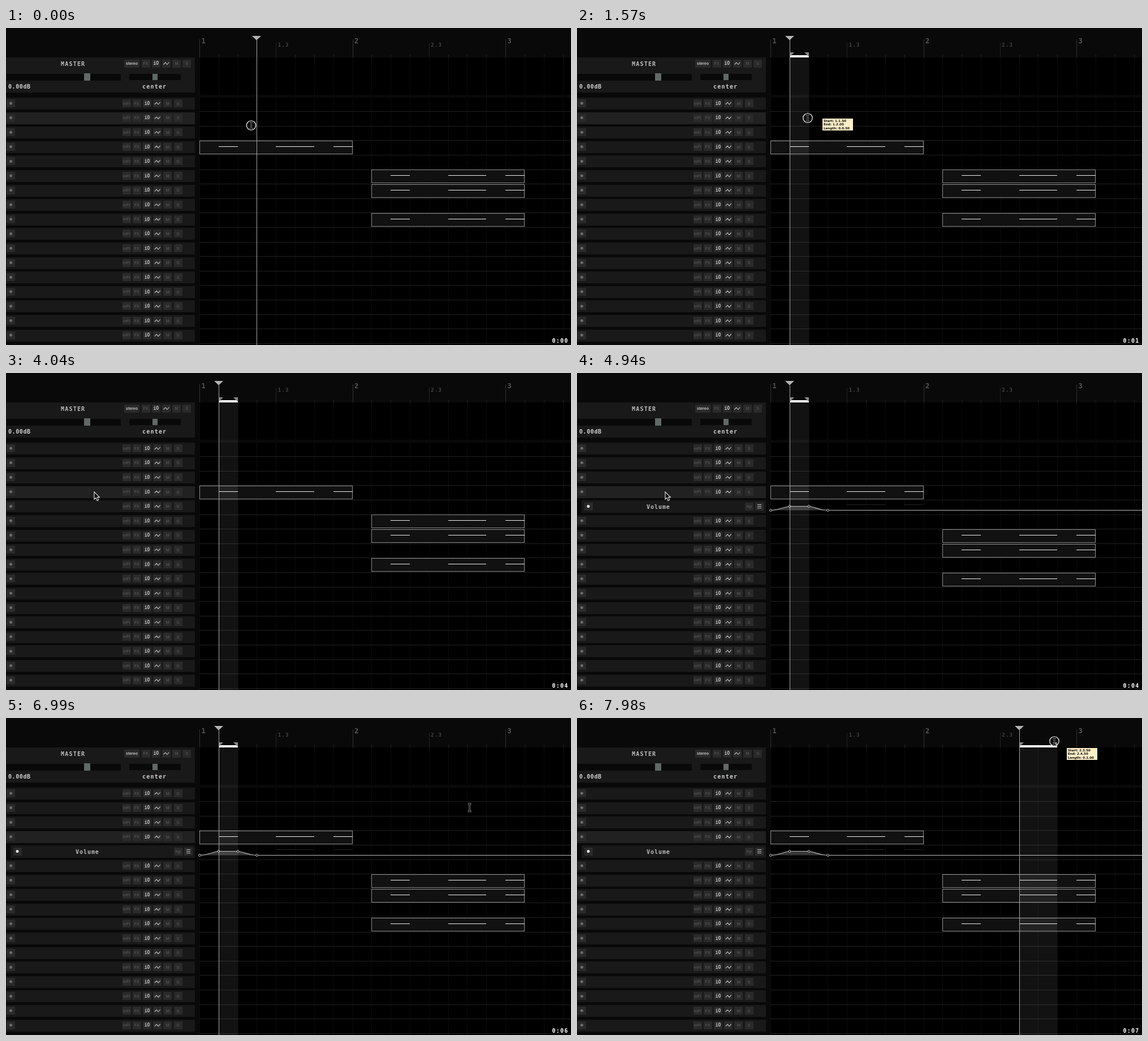
Animation, 999 px wide and 560 px high, one loop 8000 ms. Source, as an HTML page:

```html
<!DOCTYPE html>
<html lang="en">
<head>
<meta charset="utf-8">
<title>Track automation</title>
<style>
html, body { margin: 0; width: 100%; height: 100%; overflow: hidden; background: #000; }
svg { display: block; width: 999px; height: 560px; }
text { font-family: "DejaVu Sans Mono", monospace; font-weight: bold; white-space: pre; }
.small { font-family: "Liberation Sans", sans-serif; }
.tip { font-family: "DejaVu Sans", sans-serif; }
rect { shape-rendering: crispEdges; }
</style>
</head>
<body>
<svg id="stage" viewBox="0 0 999 560"></svg>
<script>
const LOOP = 8000;
const LEFT = 342, BEAT = 33.82, TOP = 122, ROW = 25.6, ROWS = 17;
const beatX = n => LEFT + n * BEAT;
const rowY = i => TOP + i * ROW;

// Markup helpers
const rect = (x, y, w, h, fill, more = '') =>
  `<rect x="${x}" y="${y}" width="${w}" height="${h}" fill="${fill}" ${more}/>`;
const hline = (x1, x2, y, color) => rect(x1, Math.round(y), x2 - x1, 1, color);
const vline = (x, y1, y2, color) => rect(Math.round(x), y1, 1, y2 - y1, color);
const text = (x, y, str, size, fill, more = '') =>
  `<text x="${x}" y="${y}" font-size="${size}" fill="${fill}" ${more}>${str}</text>`;
const group = (id, body, more = '') => `<g id="${id}" ${more}>${body}</g>`;
const path = (d, more) => `<path d="${d}" ${more}/>`;
const mid = 'text-anchor="middle"';
const wide = 'letter-spacing="1.2"';

const DIM = '#4e4e4e', LIT = '#c4c4c4';

function button(cx, cy, body, w = 15) {
  return rect(Math.round(cx - w / 2), Math.round(cy - 7), w, 14, '#2a2a2a') + body;
}

function label(cx, cy, str, size, fill, cls = 'small') {
  return text(cx, cy + size * 0.36, str, size, fill, `${mid} class="${cls}"`);
}

function toolButtons(x, cy) {
  const at = i => x + i * 18.2;
  const zig = `M${at(2) - 5} ${cy + 2}l3.5 -3.5l3 3.5l3.5 -4`;
  return button(at(0), cy, label(at(0), cy, 'FX', 7, DIM)) +
    button(at(1), cy, label(at(1), cy, 'iO', 8, LIT, '')) +
    button(at(2), cy, path(zig, `fill="none" stroke="${LIT}" stroke-width="1.1"`)) +
    button(at(3), cy, label(at(3), cy, 'M', 7.5, DIM)) +
    button(at(4), cy, label(at(4), cy, 'S', 7.5, DIM));
}

function master() {
  return rect(0, 52, 334, 62, '#191919') +
    text(97, 67, 'MASTER', 10, '#bcbcbc', wide) +
    button(222.5, 62.5, label(222.5, 62, 'stereo', 7, LIT), 27) +
    toolButtons(247, 62.5) +
    rect(1, 81, 202, 12, '#090909') + rect(138, 80, 11, 13, '#616966') +
    rect(218, 81, 91, 11, '#090909') + rect(259, 81, 9, 11, '#616966') +
    text(4, 107, '0.00dB', 10, '#d0d0d0', 'letter-spacing="0.6"') +
    text(241, 107, 'center', 10, '#d0d0d0', wide);
}

function track(i) {
  const y = rowY(i), cy = y + 11;
  return group('track' + i,
    rect(0, Math.round(y + 1), 334, 21, '#191919', `id="back${i}"`) +
    button(8, cy, `<circle cx="8.5" cy="${cy}" r="2.5" fill="#6c6c6c"/>`) +
    button(213, cy, label(213, cy, 'inFI', 7, DIM)) +
    toolButtons(231.3, cy));
}

function ruler() {
  let out = rect(0, 0, 999, 52, '#090909');
  for (let n = 0; n < 20; n++) {
    const x = beatX(n), bar = n % 8 === 0, half = n % 8 === 4;
    out += vline(x, bar ? 20 : half ? 26 : 47, 52, bar ? '#333' : '#222');
    out += vline(x, 52, 560, '#0c0c0c');
    const num = 1 + Math.floor(n / 8);
    if (bar) out += text(x + 3.5, 27, num, 12, '#555');
    if (half) out += text(x + 3.5, 33, num + '.3', 9, '#444', wide);
  }
  return out;
}

function clip(beat, row) {
  const x = Math.round(beatX(beat)), y = Math.round(rowY(row)) + 0.5;
  const note = (a, b) => hline(Math.round(beatX(beat + a)), Math.round(beatX(beat + b)), y + 9.5, '#eee');
  return rect(x + 0.5, y, 270, 23, '#111', 'stroke="#8c8c8c"') +
    note(1, 2) + note(4, 6) + note(7, 8);
}

function lane() {
  const curve = 'C360 242.5 362 237 376 235.5H410C424 237 426 242.5 443.5 242.5';
  const node = (x, y) => `<circle cx="${x}" cy="${y}" r="1.9" fill="#000" stroke="#ccc"/>`;
  return rect(0, 224, 335, 24, '#090909') + rect(8, 225, 326, 22, '#191919') +
    button(20, 235.5, '<circle cx="20" cy="235.5" r="2.5" fill="#e6e6e6"/>') +
    text(123, 240, 'Volume', 10, '#bcbcbc', 'letter-spacing="0.95"') +
    button(304.5, 235.5, label(304.5, 235, 'bp', 8, DIM)) +
    button(322.5, 235.5, [232, 235, 238].map(y => hline(319, 326, y, LIT)).join('')) +
    hline(477, 545, 232, '#242424') + hline(579, 612, 232, '#242424') +
    path('M342 242.5' + curve + 'Z', 'fill="#363636"') +
    path('M342 242.5' + curve + 'H999', 'fill="none" stroke="#bbb" stroke-width="1.1"') +
    node(342.5, 242.5) + node(376, 235.5) + node(410, 235.5) + node(443.5, 242.5);
}

function cursor() {
  const beam = 'M-3 -6.5H3M0 -6.5V6.5M-3 6.5H3';
  return group('ring', '<circle r="8.2" fill="none" stroke="#eee" stroke-width="1.3"/>') +
    group('beam', path(beam, 'fill="none" stroke="#808080" stroke-width="3"') +
      path(beam, 'fill="none" stroke="#000" stroke-width="1.2"')) +
    group('arrow', path('M0 0V13L3 10.3L5.2 15.4L7.6 14.3L5.4 9.4H9.3Z',
      'fill="#000" stroke="#eee" stroke-width="1.1"'));
}

function build() {
  const rows = [...Array(ROWS).keys()];
  const tipLine = i => text(2, 5.6 + i * 6.5, '', 5.6, '#111', `id="tip${i}" class="tip"`);
  return rect(0, 0, 342, 560, '#090909') + ruler() + rect(342, 118, 657, 5, '#090909') +
    rows.map(i => hline(342, 999, rowY(i + 1) - 0.4, '#202020')).join('') +
    master() + rows.map(track).join('') +
    clip(0, 3) + group('lane', lane()) +
    group('clips', clip(9, 5) + clip(9, 6) + clip(9, 8)) +
    group('selection',
      rect(0, 52, 0, 508, '#fff', 'id="shade" opacity="0.07"') +
      rect(0, 48, 0, 4, '#fff', 'id="range"') +
      path('M0 43H8L0 51Z', 'id="startGrip" fill="#8a8a8a"') +
      path('M0 43H-8L0 51Z', 'id="endGrip" fill="#8a8a8a"')) +
    group('playhead', path('M-8 14H8L0 21.5Z', 'fill="#b4b4b4"') + rect(0, 21, 1, 539, '#a4a4a4')) +
    group('tip', rect(0, 0, 54, 21, '#ffefc8') + [0, 1, 2].map(tipLine).join('')) +
    group('cursor', cursor()) +
    text(965.5, 556, '', 10, '#fff', 'id="clock" ' + wide);
}

document.getElementById('stage').innerHTML = build();
const el = id => document.getElementById(id);
const set = (id, attrs) => { for (const k in attrs) el(id).setAttribute(k, attrs[k]); };
const show = (id, on) => set(id, { display: on ? 'inline' : 'none' });
const move = (id, x, y) => set(id, { transform: `translate(${x} ${y})` });

// Each leg glides to (x, y) in a number of held steps
const LEGS = [
  { at: 600, gap: 140, steps: 5, x: 376.5, y: 160 },
  { at: 1430, gap: 140, steps: 1, x: 394, y: 159 },
  { at: 1570, gap: 140, steps: 1, x: 408, y: 159 },
  { at: 1870, gap: 138, steps: 6, x: 156, y: 210 },
  { at: 5690, gap: 150, steps: 4, x: 813, y: 215.5 },
  { at: 6240, gap: 150, steps: 4, x: 826, y: 198 },
  { at: 6840, gap: 142, steps: 6, x: 801, y: 39 },
  { at: 7840, gap: 140, steps: 1, x: 815, y: 41 },
  { at: 7980, gap: 140, steps: 1, x: 844, y: 41 }
];
const PRESSES = [[0, 150], [1290, 1720], [2860, 3010], [7690, LOOP]];
const SECONDS = [1040, 2120, 3150, 4040, 5090, 6240, 7240];
const ease = k => (1 - Math.cos(Math.PI * k)) / 2;

function pointer(t) {
  let x = 433.5, y = 172;
  for (const leg of LEGS) {
    if (t < leg.at) break;
    const k = ease(Math.min(1, (Math.floor((t - leg.at) / leg.gap) + 1) / leg.steps));
    x += (leg.x - x) * k;
    y += (leg.y - y) * k;
  }
  return { x, y };
}

function selectionAt(t) {
  if (t < 1430) return null;
  if (t < 7840) return { a: 1, b: 2, names: ['1.1.50', '1.2.00', '0.0.50'] };
  if (t < 7980) return { a: 13, b: 14, names: ['2.3.50', '2.4.00', '0.0.50'] };
  return { a: 13, b: 15, names: ['2.3.50', '2.4.50', '0.1.00'] };
}

function render(t) {
  const p = pointer(t), sel = selectionAt(t);
  const inPanel = p.x < 335;
  const pressed = PRESSES.some(([a, b]) => t >= a && t < b);
  move('cursor', p.x, p.y);
  show('ring', pressed);
  show('beam', !inPanel);
  show('arrow', inPanel);

  show('selection', sel);
  move('playhead', Math.round(beatX(sel ? sel.a : 3)), 0);
  if (sel) {
    const x = Math.round(beatX(sel.a)), end = Math.round(beatX(sel.b));
    set('shade', { x, width: end - x });
    set('range', { x, width: end - x });
    move('startGrip', x, 0);
    move('endGrip', end, 0);
    ['Start: ', 'End: ', 'Length: '].forEach((s, i) => { el('tip' + i).textContent = s + sel.names[i]; });
  }
  show('tip', sel && pressed && !inPanel);
  if (t < 7000) move('tip', p.x + 26, p.y + 1);
  else move('tip', p.x + 22, p.y + 12);

  const open = t >= 4940;
  show('lane', open);
  show('track4', !open);
  move('clips', 0, open ? Math.round(ROW) : 0);
  set('back1', { fill: t < 2860 ? '#212121' : '#191919' });
  set('back3', { fill: t < 2860 ? '#191919' : '#212121' });
  el('clock').textContent = '0:0' + SECONDS.filter(s => t >= s).length;
}

const start = performance.now();
function tick() {
  render((performance.now() - start) % LOOP);
  requestAnimationFrame(tick);
}
render(0);
requestAnimationFrame(tick);
</script>
</body>
</html>
```
